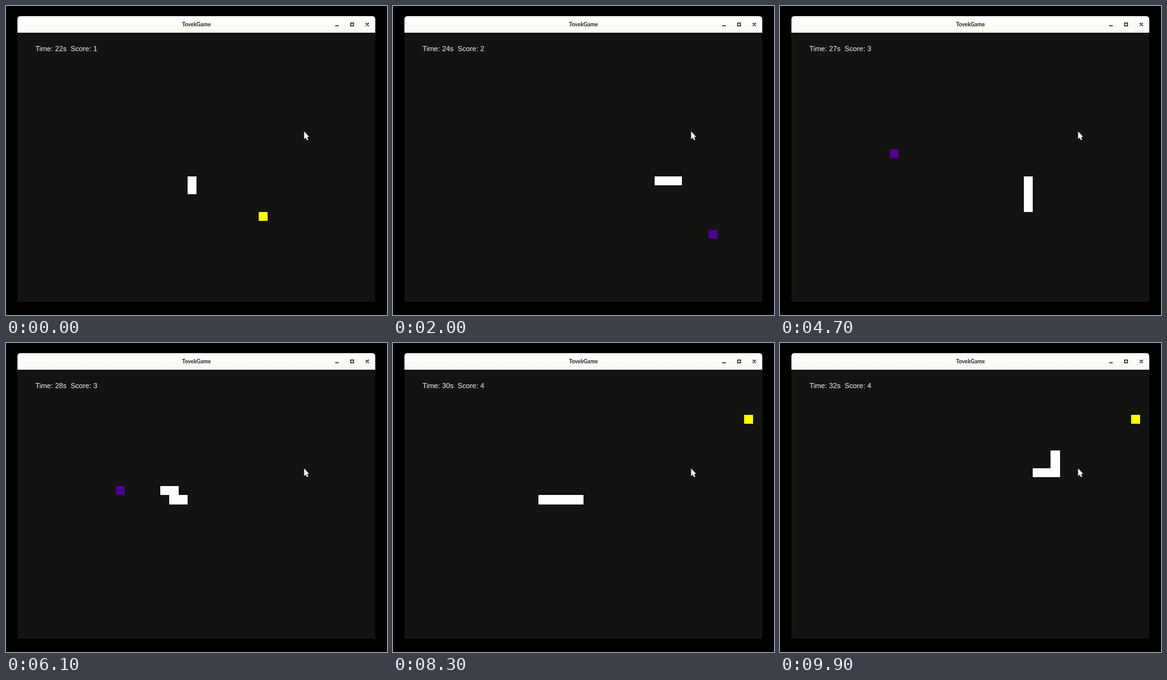
Recreate the animation shown at these times as an HTML page. Size 600 by 486 pixels, loop 10 s.

```html
<!DOCTYPE html>
<html lang="en">
<head>
<meta charset="utf-8">
<title>TovekGame</title>
<style>
  html, body { margin: 0; width: 100%; height: 100%; overflow: hidden; background: #000; }
  svg { display: block; width: 600px; height: 486px; }
  .title { font: 800 8.7px Lato, "Open Sans", sans-serif; fill: #33373a; text-anchor: middle; }
  .hud { font: 11.3px "Liberation Sans", Arial, sans-serif; fill: #f6f6f6; white-space: pre; }
  .icon { fill: none; stroke: #2c3032; stroke-width: 1.5; }
</style>
</head>
<body>
<svg viewBox="0 0 600 486" xmlns="http://www.w3.org/2000/svg">
  <defs>
    <linearGradient id="bar" x1="0" y1="0" x2="0" y2="1">
      <stop offset="0" stop-color="#ffffff"/>
      <stop offset="1" stop-color="#faf8f2"/>
    </linearGradient>
  </defs>
  <rect width="600" height="486" fill="#000"/>
  <path d="M18 42V21Q18 16 23 16H576.5Q581.5 16 581.5 21V42Z" fill="url(#bar)"/>
  <rect x="18" y="42" width="563.5" height="423.3" fill="#131311"/>
  <text class="title" x="300" y="31.7">TovekGame</text>
  <path class="icon" d="M518.3 31H524M542.7 26.7H547.3V31.3H542.7ZM566.5 26.5L571.5 31.5M571.5 26.5L566.5 31.5"/>
  <text class="hud" id="hud" x="46.2" y="70.8" xml:space="preserve"></text>
  <rect id="food" shape-rendering="crispEdges"/>
  <path id="snake" fill="#fff" shape-rendering="crispEdges"/>
  <path d="M469.5 197.3V209.3L472.1 206.9L474 211L476 210.1L474.1 206.1L477.4 205.7Z" fill="#fff"/>
</svg>
<script>
  const LOOP = 10000, TICK = 100, CELL = 14.085;
  const PAUSES = [1, 12, 22, 32, 43, 55, 67, 82, 94]; // ticks without a move
  const ROUTE = "D3 R8 U4 R7 D6 L8 U8 L9 U1 L6 D4 R4 U3 R8 U3 R6 U2";
  const DIRS = { U: [0, -1], D: [0, 1], L: [-1, 0], R: [1, 0] };
  const FOODS = [
    { at: [27, 20], color: "#ffff00" },
    { at: [34, 22], color: "#4e0090" },
    { at: [11, 13], color: "#4e0090" },
    { at: [38, 5], color: "#ffff00" }
  ];
  const el = id => document.getElementById(id);
  const px = col => Math.round(18 + col * CELL);
  const py = row => Math.round(42.3 + row * CELL);

  // Cells the head visits, beginning with the tail cell
  const trail = [[19, 16], [19, 17]];
  for (const leg of ROUTE.split(" ")) {
    const [dx, dy] = DIRS[leg[0]];
    for (let i = 0; i < +leg.slice(1); i++) {
      const [x, y] = trail[trail.length - 1];
      trail.push([x + dx, y + dy]);
    }
  }
  const meals = FOODS.slice(0, 3).map(({ at }) =>
    trail.findIndex(([x, y]) => x === at[0] && y === at[1]));

  function cellPath([x, y]) {
    return `M${px(x)} ${py(y)}H${px(x + 1)}V${py(y + 1)}H${px(x)}Z`;
  }

  function draw(time) {
    const tick = Math.floor(time / TICK);
    const head = 1 + tick - PAUSES.filter(p => p <= tick).length;
    const eaten = meals.filter(m => m < head).length;
    const score = 1 + eaten;
    const seconds = 22 + Math.floor((time + 600) / 1000);

    el("hud").textContent = `Time: ${seconds}s  Score: ${score}`;
    el("snake").setAttribute("d", trail.slice(head - score, head + 1).map(cellPath).join(""));

    const { at: [x, y], color } = FOODS[eaten];
    const box = { x: px(x), y: py(y), width: px(x + 1) - px(x), height: py(y + 1) - py(y), fill: color };
    for (const key in box) el("food").setAttribute(key, box[key]);
  }

  const start = performance.now();
  function loop() {
    draw((performance.now() - start) % LOOP);
    requestAnimationFrame(loop);
  }
  loop();
</script>
</body>
</html>
```
